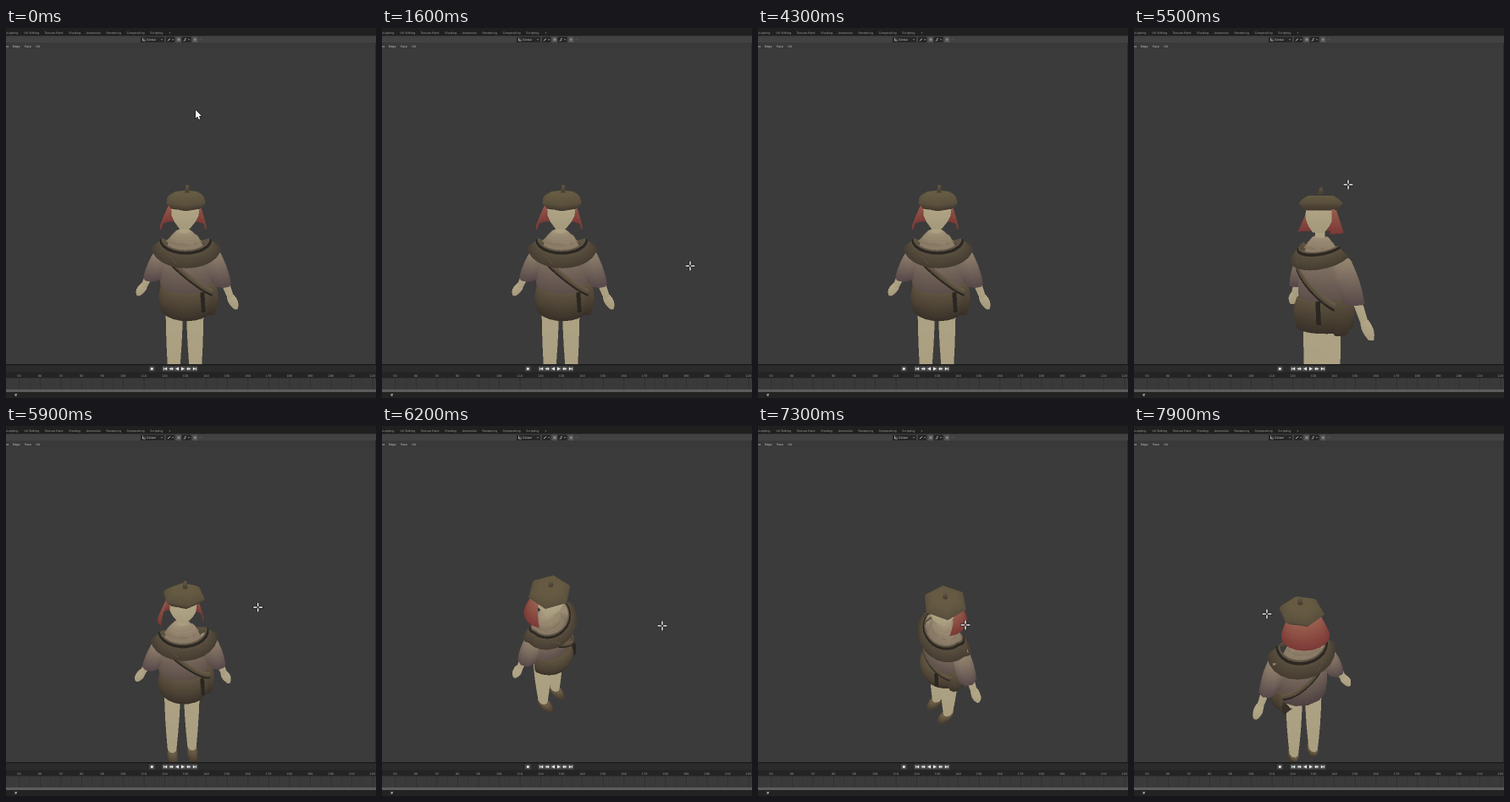
Write an HTML page with a canvas that moves like this. It is 437 by 437 pixels and loops after 8 s.

```html
<!DOCTYPE html>
<html lang="en">
<head>
<meta charset="utf-8">
<title>Viewport orbit</title>
<style>
html, body { margin: 0; width: 100%; height: 100%; overflow: hidden; background: #3b3b3b; }
canvas { display: block; width: 100vw; height: 100vh; }
</style>
</head>
<body>
<canvas id="stage" width="437" height="437"></canvas>
<script>
const ctx = document.getElementById('stage').getContext('2d');
const LOOP = 8000, STEP = 100, DRAG_START = 5200;
const D = 540;                        // camera distance
const PIVOT = { x: 203, y: 211 };     // orbit centre on the stage
const BODY_Z = -14;                   // the figure stands behind the pivot
const rad = a => a * Math.PI / 180;
const lerp = (a, b, t) => a + (b - a) * t;
const mix = (a, b, t) => a.map((v, i) => lerp(v, b[i], t));

// [time, x, y]; from DRAG_START on, the pointer drags the view
const path = [
  [0, 224, 97], [400, 431, 150], [900, 56, 367], [1600, 364, 281], [2500, 115, 428],
  [3400, 269, 220], [4200, 60, 450], [4500, 60, 450], [DRAG_START, 290, 200],
  [5500, 253, 185], [6200, 331, 236], [6450, 345, 243], [7300, 245, 235], [7900, 157, 222]
];
function pointer(t) {
  const i = Math.max(1, path.findIndex(k => k[0] >= t));
  const a = path[i - 1], b = path[i];
  return mix(a, b, (t - a[0]) / (b[0] - a[0])).slice(1);
}
const orbit = ([x, y]) => ({ az: rad(1.22 * (x - 290)), el: rad(0.98 * (y - 184)) });
const home = orbit(pointer(DRAG_START));

// ---- model: points are given as seen in the home view, plus a depth ----
const tris = [];
const rgb = h => [1, 3, 5].map(i => parseInt(h.slice(i, i + 2), 16));
const homeC = Math.cos(home.el), homeS = Math.sin(home.el);
function lift([x, y, depth]) {
  const v = y - PIVOT.y, z = depth + BODY_Z;
  const Y = (v * (D - z * homeC) - D * z * homeS) / (D * homeC - v * homeS);
  const unit = (D - z * homeC + Y * homeS) / D;
  return { p: [(x - PIVOT.x) * unit, Y, z], unit };
}
function tri(a, b, c) {
  const u = b.p.map((v, i) => v - a.p[i]), w = c.p.map((v, i) => v - a.p[i]);
  const n = [u[1] * w[2] - u[2] * w[1], u[2] * w[0] - u[0] * w[2], u[0] * w[1] - u[1] * w[0]];
  const len = Math.hypot(...n);
  if (len > 1e-6) tris.push({ v: [a, b, c], light: 1 - 0.05 * n[1] / len });
}
function mesh(rows) {
  for (let i = 0; i + 1 < rows.length; i++)
    for (let j = 0; j + 1 < rows[i].length; j++) {
      const a = rows[i][j], b = rows[i][j + 1], c = rows[i + 1][j], d = rows[i + 1][j + 1];
      tri(a, b, c);
      tri(b, d, c);
    }
}
// A tapered, optionally swelling tube; span(t) gives the angles it covers.
function solid(top, bottom, radii, colours, opt = {}) {
  const { n = 8, swell = 0, deep = 1, span = () => [0, 360], open = false } = opt;
  const [from, to] = colours.map(rgb), steps = 4;
  const ring = (t, size = 1) => {
    const { p, unit } = lift(mix(top, bottom, t));
    const r = size * unit * (lerp(...radii, t) + swell * Math.sin(Math.PI * t));
    const [a0, a1] = span(t);
    return Array.from({ length: n + 1 }, (_, j) => {
      const a = rad(lerp(a0, a1, j / n));
      return { p: [p[0] + r * Math.sin(a), p[1], p[2] + r * deep * Math.cos(a)], c: mix(from, to, t) };
    });
  };
  const rows = Array.from({ length: steps + 1 }, (_, i) => ring(i / steps));
  mesh(open ? rows : [ring(0, 0), ...rows, ring(1, 0)]);
}
// A band around the body between two closed curves of the angle.
function band(upper, lower, colours, n = 24) {
  mesh([upper, lower].map((curve, i) => Array.from({ length: n + 1 }, (_, j) =>
    ({ p: lift(curve(2 * Math.PI * j / n)).p, c: rgb(colours[i]) }))));
}

const SKIN = ['#aea284', '#aa9e80'], DARK = ['#2a2621', '#2a2621'];
const CLOTH = ['#92836d', '#57484a'], OLIVE = ['#5e5443', '#443b30'];

// Shawl edge: t runs from the collar to the hem, dipping to a V front and back.
const shawl = (t, out = 0) => a => {
  const z = (lerp(20, 29, t) + out) * Math.cos(a);
  return [lerp(212, 213, t) + (lerp(27, 41, t) + out) * Math.sin(a),
          lerp(248, 259, t) + lerp(9, 17, t) * Math.abs(Math.cos(a)) + 0.27 * z, z];
};
// Strap: a tilted hoop from the right shoulder to the left hip.
const strap = (dy, out = 0) => a => {
  const z = (29 + out) * Math.cos(a);
  return [215 + (31 + out) * Math.sin(a), 286 + dy + 25 * Math.sin(a) + 0.27 * z, z];
};

function buildFigure() {
  // hat
  solid([214, 186, 0], [214, 194, 0], [2, 3], OLIVE, { n: 6 });
  solid([213, 195, 0], [212.5, 204, -1], [15, 26], ['#61573f', '#564c3b'], { n: 6, swell: 2 });
  solid([212.5, 204, -1], [212, 211, -1], [26, 19], ['#564c3b', '#443b30'], { n: 6 });
  // head, neck, hair
  solid([212, 207, 0], [211, 236, 1], [15, 7], SKIN, { n: 12, swell: 5 });
  solid([210.5, 230, -2], [210.5, 247, -2], [5.5, 6], SKIN);
  solid([211, 207, -2], [209, 235, -4], [18, 28], ['#98604f', '#793835'],
    { n: 12, deep: 0.92, open: true, span: t => [lerp(88, 64, t), lerp(272, 296, t)] });
  // collar, coat, shawl, strap
  solid([210, 240, -3], [210, 252, -3], [10, 21], ['#9c8e76', '#81725e'], { deep: 0.8 });
  solid([211, 246, -2], [213, 317, -5], [16, 29], ['#92836d', '#4f4142'], { n: 12, swell: 7, deep: 0.78 });
  band(shawl(0), shawl(1), OLIVE);
  band(shawl(0.08, 0.7), shawl(0.24, 0.7), DARK);
  band(strap(-4), strap(4), ['#6a5d49', '#4c4235']);
  band(strap(2.5, 0.7), strap(5, 0.7), DARK);
  // hip bag
  solid([213, 302, -7], [213, 330, -7], [30, 30], ['#5a4f3d', '#393129'],
    { n: 12, swell: 3, deep: 1.06, span: () => [-80, 115] });
  solid([243, 302, 0], [242, 335, 0], [5, 6], ['#5a4f3d', '#393129'], { swell: 3, deep: 1.5 });
  solid([232, 313, 25], [233, 335, 25], [2.5, 2.5], DARK);
  // limbs: the left arm hangs a little lower
  for (const side of [-1, 1]) {
    const low = side > 0 ? 1 : 0, at = dx => 214 + side * dx;
    solid([at(28), 261, -3], [at(41), 295 + 7 * low, -6], [9, 11], CLOTH, { swell: 2, deep: 1.05 });
    solid([at(45), 293 + 9 * low, -8], [at(52), 307 + 13 * low, -10], [5, 4], SKIN);
    solid([at(51), 302 + 13 * low, -10], [at(57), 315 + 16 * low, -12], [4, 3], SKIN, { swell: 2.5 });
    const leg = 211 + side * 12;
    solid([leg, 322, -4], [leg + side, 424, -4], [10.5, 5.5], SKIN, { swell: 1, deep: 1.25 });
    solid([leg + side, 420, -3], [leg + side, 432, 2], [6, 7], ['#655844', '#453b2e'], { deep: 1.8 });
  }
}
buildFigure();

// ---- depth-buffered renderer ----
const OX = 118, OY = 165, SS = 2, W = 190 * SS, H = 232 * SS;
const layer = document.createElement('canvas');
layer.width = W;
layer.height = H;
const layerCtx = layer.getContext('2d');
const image = layerCtx.createImageData(W, H);
const depth = new Float32Array(W * H);
let lastView = '';

function renderFigure({ az, el }) {
  const view = az + ',' + el;
  if (view === lastView) return;
  lastView = view;
  image.data.fill(0);
  depth.fill(-1e9);
  const ca = Math.cos(az), sa = Math.sin(az), ce = Math.cos(el), se = Math.sin(el);
  const project = ({ p: [px, py, pz] }) => {
    const x = px * ca + pz * sa, z = pz * ca - px * sa;
    const zc = z * ce - py * se, s = D / (D - zc);
    return [(PIVOT.x + x * s - OX) * SS, (PIVOT.y + (py * ce + z * se) * s - OY) * SS, zc];
  };
  for (const t of tris) fill(t, ...t.v.map(project));
  layerCtx.putImageData(image, 0, 0);
}
function fill({ v, light }, a, b, c) {
  const area = (b[0] - a[0]) * (c[1] - a[1]) - (b[1] - a[1]) * (c[0] - a[0]);
  if (Math.abs(area) < 1e-6) return;
  const lo = i => Math.max(0, Math.floor(Math.min(a[i], b[i], c[i])));
  const hi = (i, max) => Math.min(max - 1, Math.ceil(Math.max(a[i], b[i], c[i])));
  const x0 = lo(0), x1 = hi(0, W), y1 = hi(1, H);
  for (let y = lo(1); y <= y1; y++)
    for (let x = x0; x <= x1; x++) {
      const px = x + 0.5, py = y + 0.5;
      const u = ((b[0] - px) * (c[1] - py) - (b[1] - py) * (c[0] - px)) / area;
      const w = ((c[0] - px) * (a[1] - py) - (c[1] - py) * (a[0] - px)) / area;
      const q = 1 - u - w;
      if (u < 0 || w < 0 || q < 0) continue;
      const z = u * a[2] + w * b[2] + q * c[2], i = y * W + x;
      if (z <= depth[i]) continue;
      depth[i] = z;
      for (let j = 0; j < 3; j++)
        image.data[i * 4 + j] = light * (u * v[0].c[j] + w * v[1].c[j] + q * v[2].c[j]);
      image.data[i * 4 + 3] = 255;
    }
}

// ---- interface ----
function box(x, y, w, h, col) {
  ctx.fillStyle = col;
  ctx.fillRect(x, y, w, h);
}
function text(s, x, y, col = '#a2a2a2', align = 'left') {
  ctx.font = '3.4px "DejaVu Sans", sans-serif';
  ctx.textAlign = align;
  ctx.fillStyle = col;
  ctx.fillText(s, x, y);
  return ctx.measureText(s).width;
}
function row(words, x, y, gap, col) {
  for (const s of words) x += text(s, x, y, col) + gap;
}
function trace(pts) {
  ctx.beginPath();
  pts.forEach(p => ctx.lineTo(...p));
}
function line(pts, col, width) {
  trace(pts);
  ctx.strokeStyle = col;
  ctx.lineWidth = width;
  ctx.stroke();
}
function poly(pts, col) {
  trace(pts);
  ctx.fillStyle = col;
  ctx.fill();
}
function dot(x, y, r, col) {
  ctx.beginPath();
  ctx.arc(x, y, r, 0, 7);
  ctx.fillStyle = col;
  ctx.fill();
}
const chevron = x => line([[x - 1, 13], [x, 14.2], [x + 1, 13]], '#aaa', 0.6);

function drawTop() {
  box(0, 0, 437, 9.5, '#202020');
  box(0, 9.5, 437, 8, '#424242');
  box(0, 17.5, 437, 7.5, '#393939');
  text('Sculpting', 14.5, 6.6, '#a2a2a2', 'right');
  row(['UV Editing', 'Texture Paint', 'Shading', 'Animation', 'Rendering',
       'Compositing', 'Scripting', '+'], 21.5, 6.6, 6.6);
  text('Vertex', 3.2, 22.8, '#d0d0d0', 'right');
  row(['Edge', 'Face', 'UV'], 8, 22.8, 5.6, '#d0d0d0');
  box(159, 10.5, 28, 6.5, '#262626');
  line([[161.5, 11.5], [161.5, 15], [165, 15]], '#ccc', 0.7);
  line([[161.5, 15], [164, 12.5]], '#ccc', 0.6);
  text('Global', 166, 14.8, '#ccc');
  box(189, 10.5, 10, 6.5, '#262626');
  line([[191, 15], [194, 12.5]], '#bbb', 1);
  box(201, 10.5, 6, 6.5, '#555');
  dot(204, 13.7, 1.6, '#8a8a8a');
  box(207.5, 10.5, 11, 6.5, '#262626');
  line([[209.5, 15], [211.5, 15], [211.5, 12.5], [213, 12.5]], '#bbb', 0.7);
  box(220.5, 10.5, 5.5, 6.5, '#5a5a5a');
  dot(223.3, 13.7, 1, '#aaa');
  line([[228, 14.5], [230, 12.5], [232, 14.5]], '#5c5c5c', 0.7);
  [184, 197, 216].forEach(chevron);
}
// Playback glyphs mirror about the gap between the two play arrows.
function drawPlayback() {
  const mid = 205.5, y = 402.5;
  const button = x => box(x - 3.3, 399.5, 6.6, 6, '#4c4c4c');
  button(172.3);
  dot(172.3, y, 1.5, '#eee');
  for (const dir of [-1, 1]) {
    const at = dx => mid + dir * dx;
    const arrow = (dx, s) => poly([[at(dx - s), y - s], [at(dx + s), y], [at(dx - s), y + s]], '#eee');
    [3.5, 10.5, 17.5].forEach(dx => button(at(dx)));
    arrow(3.5, 2);
    arrow(11.5, 1.5);
    poly([[at(7.7), y], [at(9), y - 1.5], [at(10.3), y], [at(9), y + 1.5]], '#eee');
    arrow(17, 1.7);
    box(at(19.2) - 0.4, y - 1.6, 0.8, 3.2, '#eee');
  }
}
function drawTimeline() {
  box(0, 397, 437, 40, '#2b2b2b');
  box(0, 397, 437, 1.2, '#191919');
  box(0, 406.5, 437, 7, '#242424');
  box(0, 413.5, 437, 13.3, '#3a3a3a');
  drawPlayback();
  for (let i = 0; i < 18; i++) {
    const x = 15.5 + i * 24.55;
    text(50 + i * 10, x, 411.5, '#a0a0a0', 'center');
    box(x, 413.5, 0.6, 13.3, '#2c2c2c');
    box(x + 12.3, 413.5, 0.4, 13.3, '#313131');
  }
  box(0, 426.8, 437, 3.2, '#5c5c5c');
  box(0, 430, 437, 7, '#232323');
  box(10.5, 432, 2, 2.8, '#8a8a8a');
  box(11.5, 432, 1, 1.3, '#ddd');
}
function drawCursor(x, y, arrow) {
  ctx.save();
  ctx.translate(x, y);
  if (arrow) {
    const tip = [[0, 0], [0, 9.5], [2.2, 7.6], [3.8, 11], [5.4, 10.2], [3.9, 7], [6.8, 6.8]];
    line([...tip, tip[0]], '#111', 1.2);
    poly(tip, '#fff');
  } else {
    for (const [col, w, r] of [['#111', 2.8, 6], ['#fff', 1.4, 5.4]])
      for (const [dx, dy] of [[1, 0], [-1, 0], [0, 1], [0, -1]])
        line([[dx * 1.2, dy * 1.2], [dx * r, dy * r]], col, w);
  }
  ctx.restore();
}
function frame(now) {
  const t = Math.floor(now % LOOP / STEP) * STEP;
  const at = pointer(t);
  box(0, 0, 437, 437, '#3b3b3b');
  renderFigure(t < DRAG_START ? home : orbit(at));
  ctx.drawImage(layer, OX, OY, W / SS, H / SS);
  drawTop();
  drawTimeline();
  box(436, 17.5, 1, 380, '#2a2a2a');
  drawCursor(...at, t < 300);
}
const start = performance.now();
(function tick() {
  frame(performance.now() - start);
  requestAnimationFrame(tick);
})();
</script>
</body>
</html>
```
